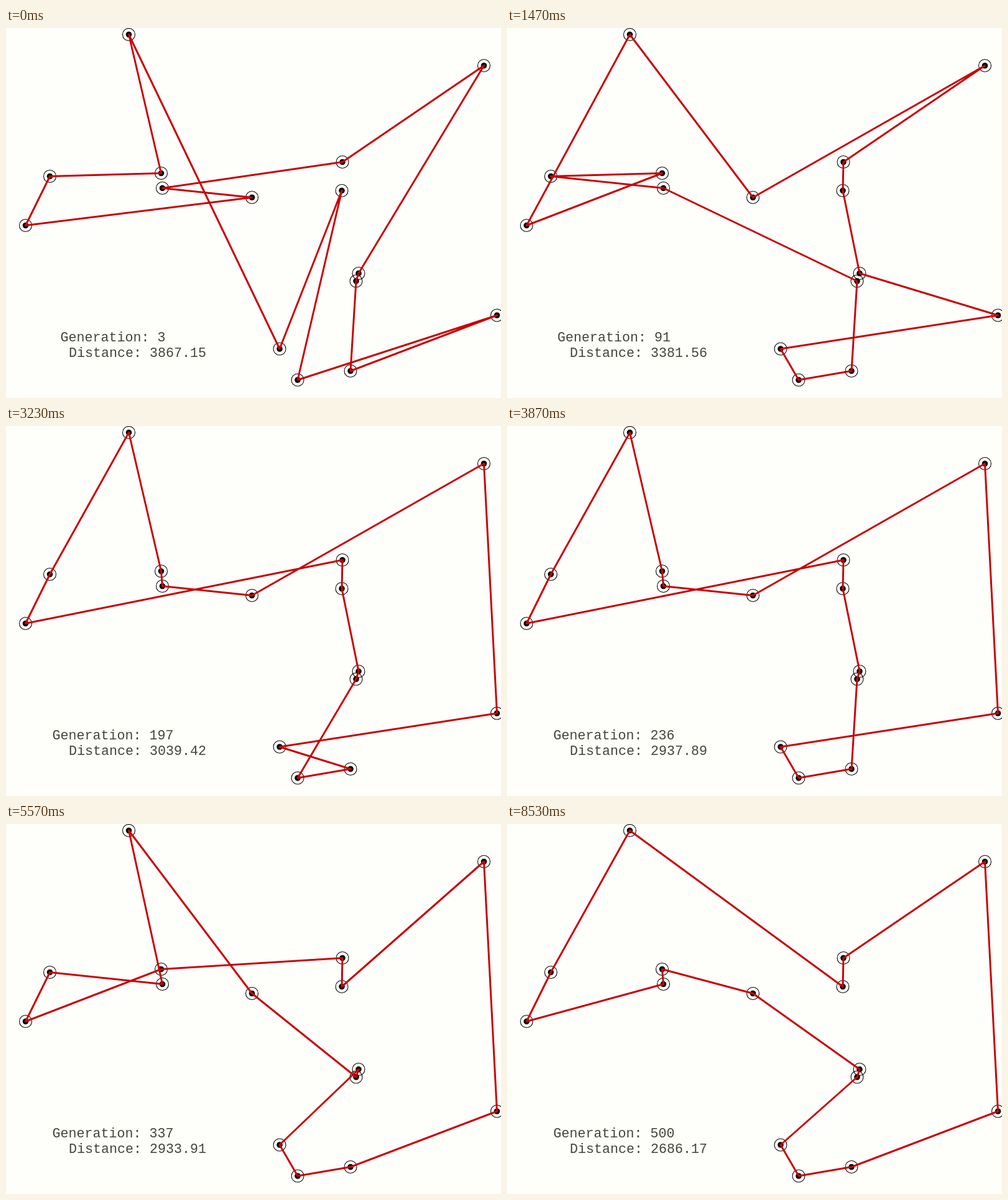
Write an HTML page with a canvas that moves like this. It is 796x595 px and loops after 8560 ms.

```html
<!DOCTYPE html>
<html>
<head>
<meta charset="utf-8">
<style>
  html, body { margin: 0; width: 100%; height: 100%; overflow: hidden; background: #fefefb; }
  canvas { display: block; }
</style>
</head>
<body>
<canvas id="stage" width="796" height="595"></canvas>
<script>
const LOOP = 8560, FRAME = 100 / 3;
const ctx = document.getElementById('stage').getContext('2d');

const cities = {
  A: [197.5, 10.5], B: [768.5, 60.5], C: [541, 215.5], D: [540, 261.5], E: [249.5, 233.5],
  F: [251.5, 257.5], G: [70.5, 238.5], H: [31.5, 317.5], I: [395.5, 272.5], J: [567, 394.5],
  K: [563, 407], L: [789.5, 462], M: [440, 516], N: [554, 551.5], O: [469, 566]
};

// First step, order of visit, distance shown
const tours = [
  [0, 'AEGHIFCBJKNLODM', 3867.15],
  [22, 'AIBCDJLMONKFGEH', 3381.56],
  [60, 'AEFDOMKNJLBCIHG', 3166.40],
  [87, 'AEFIBLMNOKJDCHG', 3039.42],
  [117, 'AFGHEDCBLNOMJKI', 2904.66],
  [170, 'ACDBLNOMKJIEFHG', 2691.21],
  [230, 'ADCBLNOMKJIEFHG', 2686.17]
];

function length(order) {
  let sum = 0;
  for (let i = 0; i < order.length; i++) {
    const a = cities[order[i]], b = cities[order[(i + 1) % order.length]];
    sum += Math.hypot(a[0] - b[0], a[1] - b[1]);
  }
  return sum;
}

function randomizer(seed) {
  let s = seed * 7919 + 17;
  return () => (s = s * 16807 % 2147483647) / 2147483647;
}

// Shortest of a few random segment reversals
function mutate(order, seed) {
  const rand = randomizer(seed);
  let best = null;
  for (let k = 0; k < 12; k++) {
    const from = 1 + Math.floor(rand() * 12);
    const to = from + 2 + Math.floor(rand() * (14 - from));
    const part = [...order.slice(from, to)].reverse().join('');
    const next = order.slice(0, from) + part + order.slice(to);
    if (!best || length(next) < length(best)) best = next;
  }
  return best;
}

function tourAt(step) {
  const [, order, distance] = tours.filter(t => t[0] <= step).pop();
  const block = step >> 2;
  if (block % 4 !== 1) return [order, distance];
  const variant = mutate(order, block);
  return [variant, distance + length(variant) - length(order)];
}

function generationAt(step) {
  const lead = step > 115 && step < 160 ? 1 : 0;
  return Math.min(500, 3 + 2 * step + lead);
}

function disc(x, y, r) {
  ctx.beginPath();
  ctx.arc(x, y, r, 0, 2 * Math.PI);
}

function draw(step) {
  const [order, distance] = tourAt(step);
  ctx.fillStyle = '#fefefb';
  ctx.fillRect(0, 0, 796, 595);

  ctx.fillStyle = ctx.strokeStyle = '#080808';
  ctx.lineWidth = 1.1;
  for (const [x, y] of Object.values(cities)) {
    disc(x, y, 10);
    ctx.stroke();
    disc(x, y, 4.8);
    ctx.fill();
  }

  ctx.strokeStyle = '#c80408';
  ctx.lineWidth = 3;
  ctx.lineJoin = 'round';
  ctx.beginPath();
  for (const name of order) ctx.lineTo(...cities[name]);
  ctx.closePath();
  ctx.stroke();

  ctx.fillStyle = '#45453a';
  ctx.font = '21.67px "Liberation Mono", "Courier New", monospace';
  ctx.textAlign = 'center';
  ctx.fillText('Generation: ' + generationAt(step), 172, 503.5);
  ctx.textAlign = 'left';
  ctx.fillText('Distance: ' + distance.toFixed(2), 101, 528.5);
}

function tick() {
  // Steps start on the nearest 10 ms, hence the small offset
  draw(Math.floor((performance.now() % LOOP + 4) / FRAME));
  requestAnimationFrame(tick);
}
tick();
</script>
</body>
</html>
```
